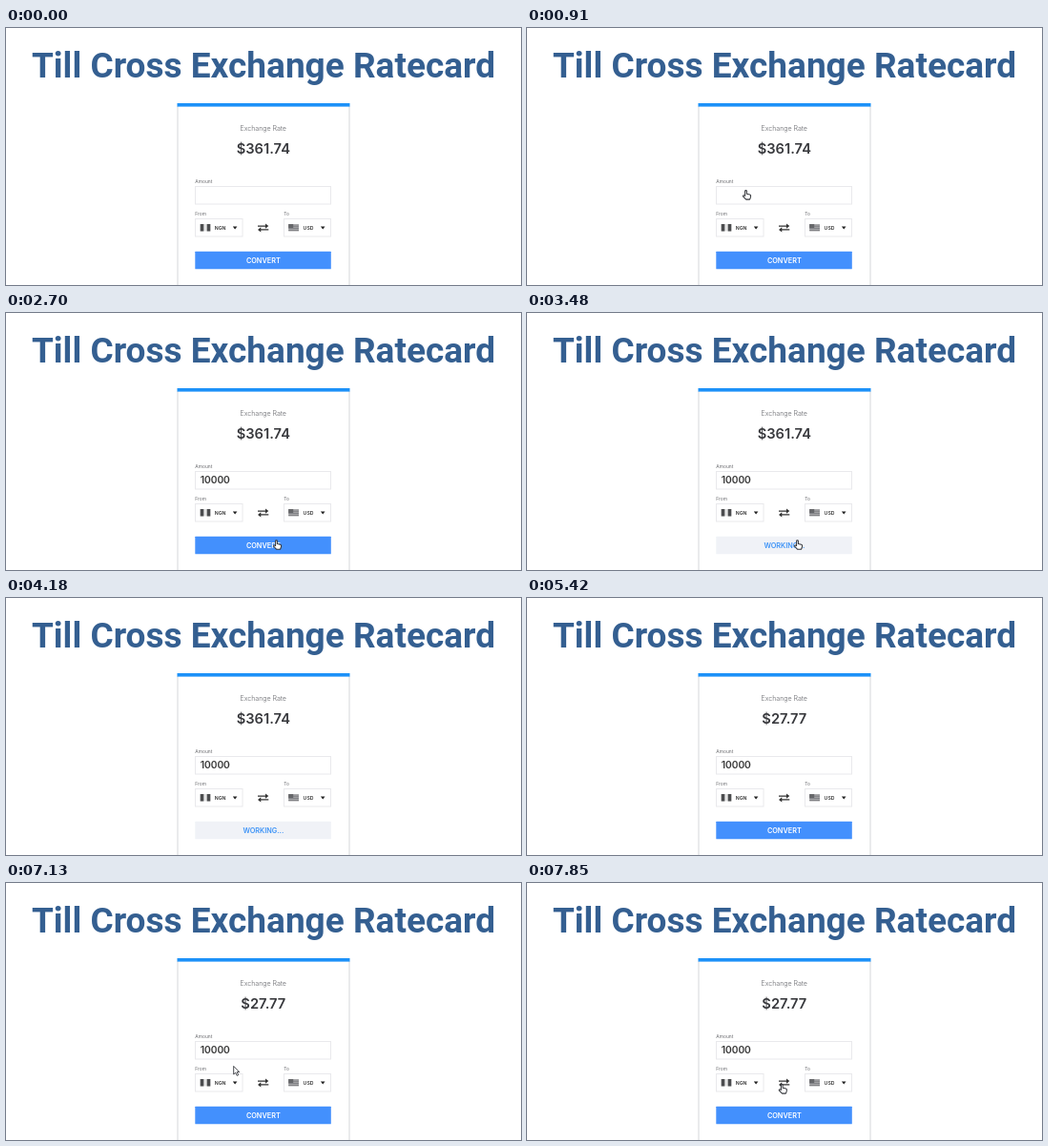
An HTML page for the animation above (8 s loop, 540x270 px).

```html
<!DOCTYPE html>
<html lang="en">
<head>
<meta charset="utf-8">
<title>Currency converter</title>
<style>
  html, body { margin: 0; width: 100%; height: 100%; overflow: hidden; background: #fff; }
  svg { display: block; width: 100%; height: 100%; font-family: Inter, Roboto, sans-serif; }
  .title { font: 700 37px Roboto, sans-serif; fill: #345f91; }
  .mid { text-anchor: middle; }
  .rate { font-size: 14.7px; font-weight: 600; fill: #38393d; }
  .label { font-size: 4.9px; fill: #68696d; }
  .code { font-size: 5.2px; font-weight: 600; fill: #333; }
  .amount { font-size: 10.4px; font-weight: 500; fill: #333; stroke: #333; stroke-width: .15; }
  .action { font-size: 7.3px; font-weight: 600; }
  .field { fill: #fff; stroke: #e9e9ec; }
  .cursor path { fill: #fff; stroke: #34363b; stroke-linejoin: round; }
</style>
</head>
<body>
<svg viewBox="0 0 540 270">
  <text class="title mid" x="270" y="52.3">Till Cross Exchange Ratecard</text>

  <path d="M180 82V270M360 82V270" stroke="#dfe0e3" stroke-width="1.3"/>
  <rect x="179.5" y="79" width="181" height="3.6" fill="#1c91f8"/>

  <text class="mid" x="269.7" y="108" font-size="7.1" font-weight="300" letter-spacing="-.06" fill="#66676c">Exchange Rate</text>
  <text class="rate mid" id="rate" x="269.8" y="131.5"></text>

  <text class="label" x="198.3" y="162.6">Amount</text>
  <rect class="field" x="198.5" y="166.5" width="142" height="18.5"/>
  <text class="amount" id="amount" x="203.7" y="179">10000</text>

  <text class="label" x="198.3" y="197">From</text>
  <text class="label" x="291.3" y="197">To</text>
  <rect class="field" x="198.5" y="200.5" width="49.5" height="18.5"/>
  <rect class="field" x="291.5" y="200.5" width="49" height="18.5"/>

  <rect x="203.7" y="206" width="10.6" height="7.4" fill="#e6e6e6"/>
  <path d="M203.7 206h3.6v7.4h-3.6zM210.7 206h3.6v7.4h-3.6z" fill="#4b4c4e"/>
  <rect x="296.2" y="206" width="10.8" height="7.4" fill="#a8a8aa"/>
  <path d="M296.2 208.2H307M296.2 210.4H307M296.2 212.6H307" stroke="#77787b" stroke-width=".9"/>
  <rect x="296.2" y="206" width="5" height="4" fill="#66676a"/>

  <text class="code" x="218.8" y="211.7">NGN</text>
  <text class="code" x="311.6" y="211.7">USD</text>
  <path d="M237.8 208.5h4.6l-2.3 3zM329.9 208.5h4.6l-2.3 3z" fill="#222"/>

  <g fill="#333">
    <path d="M264 207.4h8v-2l3.3 2.7-3.3 2.7v-2h-8z"/>
    <path d="M275.3 211.2h-8v-2l-3.3 2.7 3.3 2.7v-2h8z"/>
  </g>

  <rect id="button" x="198.3" y="234.7" width="142.5" height="18.6" rx=".6"/>
  <text class="action mid" id="action" x="269.8" y="246.7"></text>

  <g class="cursor" id="cursor">
    <path id="arrow" stroke-width=".9" d="M.4 .4V9l2-1.8 1.5 3.2 1.5-.7-1.5-3.1h2.5z"/>
    <path id="hand" stroke-width="1.05" d="M-.9 6.1V1.2a.9 .9 0 0 1 1.8 0V4l3.2.7q1.2.3 1 1.6l-.5 2.3-.6 1.2H.2L-3 6.5q.1-1.2 1.1-.9z"/>
  </g>
</svg>

<script>
const LOOP = 8000;
const el = id => document.getElementById(id);
const parts = Object.fromEntries(
  ['rate', 'amount', 'button', 'action', 'cursor', 'arrow', 'hand'].map(id => [id, el(id)]));

// Each move runs from start to end in whole steps, then rests until hidden.
const moves = [
  { start: 380, end: 910, hide: 1620, steps: 8, path: [[251, 237], [244, 213], [234, 181], [229.5, 170.3]] },
  { start: 2010, end: 2700, hide: 4110, steps: 10, path: [[232, 170], [246, 190], [270, 226], [283.5, 238.5]] },
  { start: 4110, end: 4110, hide: 4180, steps: 1, path: [[299, 259]] },
  { start: 6200, end: 6600, hide: 6980, steps: 6, path: [[303, 257], [283, 222], [260, 187], [249.5, 172.5]] },
  { start: 6980, end: 7770, hide: 7850, steps: 11,
    path: [[245, 178], [238.3, 192], [243, 207], [253, 217], [262, 216], [267.3, 212]] },
  { start: 7850, end: 7850, hide: LOOP, steps: 1, path: [[267.3, 211.3]] }
];

// x, y, width, height of the places that show the hand
const hotAreas = [[198, 166, 143, 19], [198, 200, 50, 19], [291, 200, 50, 19],
                  [263, 205, 13, 11], [198, 235, 143, 18]];

function along(path, p) {
  const at = p * (path.length - 1);
  const i = Math.min(Math.floor(at), path.length - 1);
  const a = path[i], b = path[i + 1] || a;
  return a.map((v, k) => v + (b[k] - v) * (at - i));
}

function pointer(t) {
  const move = moves.find(m => t >= m.start && t < m.hide);
  if (!move) return null;
  const gaps = move.steps - 1;
  const p = gaps ? Math.min(1, Math.floor((t - move.start) / (move.end - move.start) * gaps + .1) / gaps) : 0;
  return along(move.path, p);
}

const show = (node, on) => node.setAttribute('visibility', on ? 'visible' : 'hidden');

function draw(t) {
  const working = t >= 3480 && t < 5420;
  parts.rate.textContent = t < 5420 ? '$361.74' : '$27.77';
  show(parts.amount, t >= 1620);
  parts.button.setAttribute('fill', working ? '#f0f2f7' : '#4390fd');
  parts.action.setAttribute('fill', working ? '#3d93f7' : '#fff');
  parts.action.textContent = working ? 'WORKING...' : 'CONVERT';

  const at = pointer(t);
  const hot = at && hotAreas.some(([x, y, w, h]) =>
    at[0] >= x && at[0] <= x + w && at[1] >= y && at[1] <= y + h);
  show(parts.hand, at && hot);
  show(parts.arrow, at && !hot);
  if (at) parts.cursor.setAttribute('transform', `translate(${at})`);
}

const began = performance.now();
function tick() {
  draw((performance.now() - began) % LOOP);
  requestAnimationFrame(tick);
}
tick();
</script>
</body>
</html>
```
